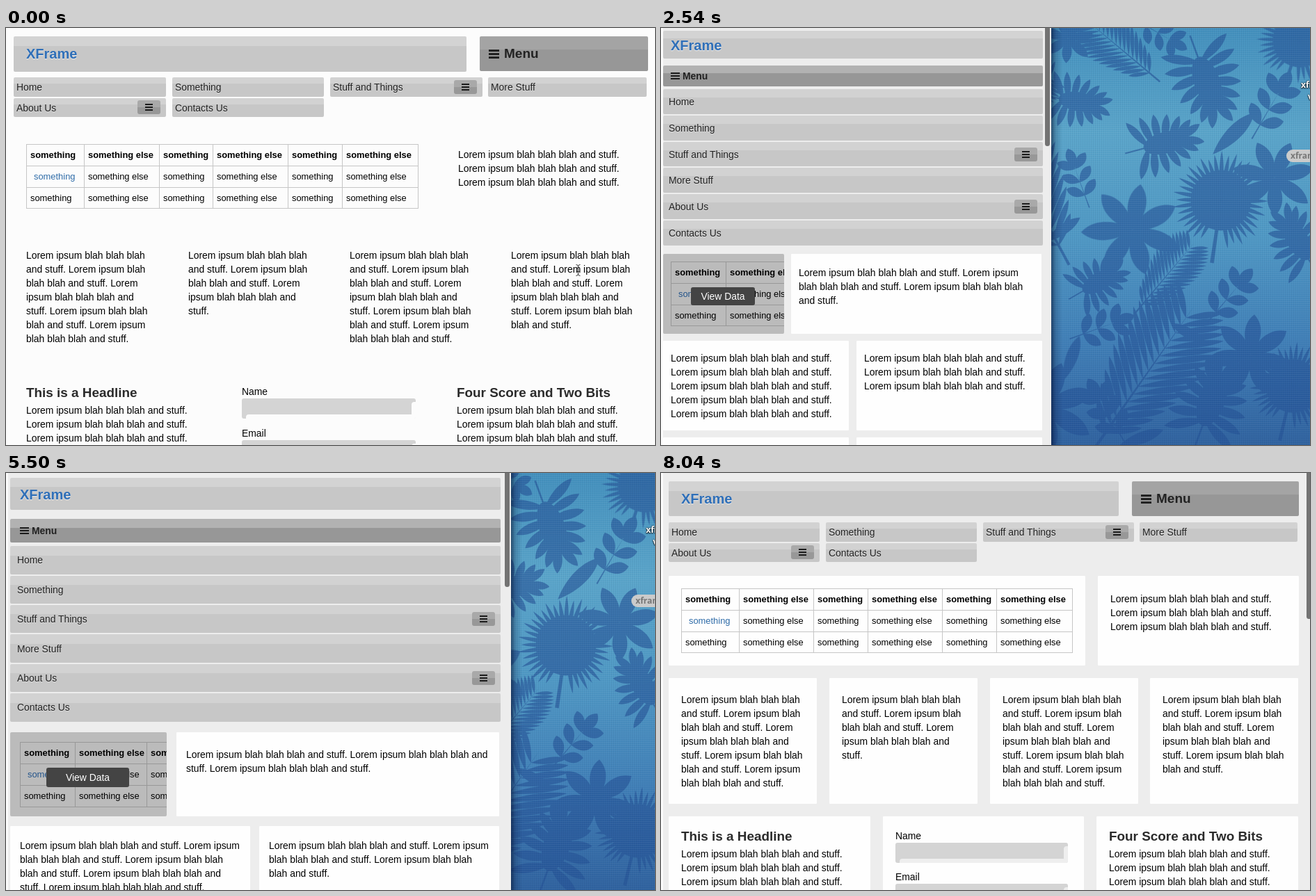
Write an HTML page that moves like this. It is 933 px wide and 600 px high and loops after 8390 ms.

```html
<!DOCTYPE html>
<html lang="en">
<head>
<meta charset="utf-8">
<title>Responsive page demo</title>
<style>
  html, body { margin: 0; width: 100%; height: 100%; overflow: hidden; }
  body { font: 13.92px/20px "Liberation Sans", Arial, sans-serif; color: #000; }
  #stage { position: relative; width: 933px; height: 600px; overflow: hidden; }
  #stage div, #stage p { position: absolute; margin: 0; box-sizing: border-box; }
  p { white-space: nowrap; }
  #desk { position: absolute; inset: 0; }
  #weave {
    inset: 0;
    background:
      repeating-linear-gradient(rgba(255,255,255,.05) 0 1px, transparent 0 3px),
      repeating-linear-gradient(90deg, rgba(0,20,60,.05) 0 1px, transparent 0 3px);
  }
  .file { font: bold 12px/18px "Open Sans", "DejaVu Sans", sans-serif; color: #fff; text-shadow: 0 1px 2px #000, 0 0 2px #000; }
  .pill { left: 899px; top: 175px; width: 70px; height: 18px; border-radius: 9px; padding-left: 6px; background: #cbcbcb; color: #777; text-shadow: none; }
  #shade { top: 0; width: 16px; height: 600px; background: linear-gradient(90deg, rgba(0,10,40,.55), rgba(0,10,40,.18) 40%, transparent); }
  #page { left: 0; top: 0; height: 600px; overflow: hidden; background: #ededed; border-left: 3px solid #fbfbfb; }
  #page > * { margin-left: -3px !important; }
  .card { background: #fefefe; overflow: hidden; border-radius: 1px; }
  .plain, .plain .card { background: #fcfcfc !important; }
  .card.dim { background: #bbb; border-radius: 2px; }
  .bar { border-radius: 2px; background: linear-gradient(#d3d3d3 28%, #c7c7c7 0); }
  .nav { background: linear-gradient(#d2d2d2 33%, #c7c7c7 0); }
  .menu { background: linear-gradient(#b2b2b2 38%, #979797 0); }
  .menu.big { background: linear-gradient(#a4a4a4 38%, #979797 0); }
  .knob { border-radius: 3px; background: linear-gradient(#a9a9a9 48%, #989898 0); }
  .lines { background: repeating-linear-gradient(#1c1c1c 0 2px, transparent 0 4px); }
  .lines.big { background: repeating-linear-gradient(#222 0 2.5px, transparent 0 5px); }
  .logo { font-size: 20px; font-weight: bold; color: #2f6fb8; text-shadow: 0 1px 1px #eee; }
  .item { color: #222; text-shadow: 0 1px 0 rgba(255,255,255,.4); }
  .label { font-weight: bold; color: #222; }
  .label.big { font-size: 19px; }
  .head { font-size: 18.9px; font-weight: bold; color: #2b2b2b; }
  .cell { border: 1px solid #c6c6c6; padding-left: 5px; font-size: 12.9px; line-height: 30px; white-space: nowrap; }
  .dim .cell { border-color: #989898; }
  .th { font-weight: bold; }
  .link { padding-left: 10px; color: #2f6ca8; }
  .dim .link { color: #23548a; }
  .view { display: flex; align-items: center; justify-content: center; background: #444; color: #fff; border-radius: 3px; }
  .field { background: #d4d4d4; border-radius: 3px; overflow: hidden; }
  .edge { background: #eee; border-top-left-radius: 4px; }
  .plain .edge { background: #fcfcfc; }
  .thumb { background: #737373; border-radius: 0 0 4px 4px; }
  #cursor { left: 819px; top: 340px; }
</style>
</head>
<body>
<div id="stage">
  <svg id="desk" width="933" height="600">
    <defs>
      <linearGradient id="sky" x2="0" y2="1">
        <stop offset="0" stop-color="#4390bd"/>
        <stop offset=".25" stop-color="#5aa5ca"/>
        <stop offset=".5" stop-color="#4f98c4"/>
        <stop offset=".75" stop-color="#407fb7"/>
        <stop offset="1" stop-color="#2f629f"/>
      </linearGradient>
    </defs>
    <rect width="933" height="600" fill="url(#sky)"/>
    <g id="leaves" fill="#245094" opacity=".6"/>
  </svg>
  <div id="weave"></div>
  <p class="file" style="left:920px;top:73px">xframe</p>
  <p class="file" style="left:930px;top:90px">v1</p>
  <div class="file pill">xframe</div>
  <div id="shade"></div>
  <div id="page"></div>
  <svg id="cursor" style="position:absolute" width="8" height="17" fill="none" stroke="#333">
    <path d="M.5 .5Q3.5 .5 3.5 3V14Q3.5 16.5 .5 16.5M6.5 .5Q3.5 .5 3.5 3M3.5 14Q3.5 16.5 6.5 16.5M2 10.5H5"/>
  </svg>
</div>
<script>
const LOOP = 8390;
// time, window width
const STEPS = [
  [0, 943], [1490, 915], [1640, 850], [1790, 773], [1940, 735], [2090, 702], [2240, 681],
  [2540, 561], [2690, 505], [2840, 455], [2990, 418], [3130, 396], [3280, 383],
  [4480, 388], [4630, 405], [4770, 438], [4910, 482], [5060, 611],
  [5360, 668], [5500, 726], [5800, 758], [5950, 796], [6100, 836], [6250, 875],
  [6400, 900], [6550, 920], [6700, 933], [6850, 936], [7300, 937]
];
const NAV = ['Home', 'Something', 'Stuff and Things', 'More Stuff', 'About Us', 'Contacts Us'];
const hasKnob = i => i === 2 || i === 4;
const $ = id => document.getElementById(id);
const many = (n, f) => Array.from({ length: n }, (_, i) => f(i)).join('');
const lorem = n => many(n, () => 'Lorem ipsum blah blah blah and stuff. ');

// Desktop leaves, drawn in a box of about 200 units
const petal = (l, w, a, x = 0, y = 0) =>
  `<path transform="translate(${x} ${y}) rotate(${a})" d="M0 0C${w * .7} ${-l * .25} ${w * 1.2} ${-l * .7} 0 ${-l}C${-w * 1.2} ${-l * .7} ${-w * .7} ${-l * .25} 0 0"/>`;
const pair = (l, w, a, y) => petal(l, w, a, 0, y) + petal(l, w, -a, 0, y);
const SHAPES = {
  star: () => many(7, i => petal(88 + i * 5 % 14, 24, i * 51.4)),
  fan: () => '<circle r="62"/><path d="M-3 0h6l5 130h-8z"/>' +
    many(37, i => petal(88 + i * 37 % 15, 6, i * 9 - 162)),
  frond: () => '<path d="M-2 125L0-105 2 125z"/>' +
    many(16, i => pair(28 + 58 * Math.sin(Math.PI * (i + 2) / 19), 6, 48, 95 - 12 * i)),
  monstera: () => '<ellipse rx="30" ry="62"/><path d="M-2 50h4v65h-4z"/>' +
    many(7, i => pair(92 - i * 4, 15, 118 - 16 * i, 48 - 15 * i)),
  sprig: () => '<path d="M-2 110L0-40 2 110z"/>' + petal(70, 24, 0, 0, -35) +
    many(3, i => pair(66, 22, 52, 65 - 48 * i)),
  oval: () => petal(200, 34, 0, 0, 100)
};
// x, y, size in percent, turn
const LEAVES = {
  star: [[678, 290, 75, 10], [882, 215, 62, 25], [848, 470, 66, 5], [553, 545, 76, 20], [440, 38, 66, 0], [585, 15, 40, 30]],
  fan: [[805, 248, 70, 10], [425, 500, 66, -15], [918, 18, 62, 20], [908, 515, 62, 15]],
  frond: [[525, 225, 105, -28], [700, 495, 112, 35], [728, 355, 58, 40], [510, 90, 58, 70], [655, 25, 65, -50], [400, 200, 55, 20]],
  monstera: [[785, 78, 62, 160], [600, 106, 46, 100], [725, 165, 52, 75], [630, 365, 44, 60], [492, 440, 58, 35], [792, 535, 64, 20], [915, 305, 52, -30], [420, 310, 55, 40]],
  sprig: [[635, 430, 46, 70], [818, 385, 48, 40], [878, 110, 52, 30], [600, 215, 42, -20], [450, 170, 48, -35], [640, 550, 50, -30], [720, 10, 40, 120]],
  oval: [[823, 152, 42, 45], [395, 130, 34, -40], [578, 290, 30, 55], [760, 440, 30, -60], [590, 475, 34, 20], [690, 590, 34, 70]]
};
$('leaves').innerHTML = Object.entries(LEAVES).map(([kind, spots]) => spots.map(([x, y, s, a]) =>
  `<g transform="translate(${x} ${y}) rotate(${a}) scale(${s / 100})">${SHAPES[kind]()}</g>`).join('')).join('');

// Page parts
const rect = (l, t, r, b, cls, body = '') => {
  [l, t, r, b] = [l, t, r, b].map(Math.round);
  return `<div class="${cls}" style="left:${l}px;top:${t}px;width:${r - l}px;height:${b - t}px">${body}</div>`;
};
const text = (x, mid, s, cls = '', w = 0) =>
  `<p class="${cls}" style="left:${Math.round(x)}px;top:${Math.round(mid) - 10}px;${w ? `width:${w}px;white-space:normal` : ''}">${s}</p>`;
const card = (l, t, r, b, pad, mid, n) =>
  rect(l, t, r, b, 'card') + text(l + pad, t + mid, lorem(n), '', r - l - 2 * pad + 2);
const knob = (r, mid) =>
  rect(r - 33, mid - 10, r, mid + 10, 'knob', rect(11, 5, 22, 15, 'lines'));

function table(x, y, first, wide, slim) {
  const widths = [first, wide, slim, wide, slim, wide + 1.5];
  return many(3, row => {
    let l = x;
    return widths.map((w, i) => {
      const cls = row === 0 ? ' th' : row === 1 && i === 0 ? ' link' : '';
      const top = y + row * 30.8;
      const cell = rect(l, top, Math.round(l + w) + 1, Math.round(top + 30.8) + 1, 'cell' + cls,
        i % 2 ? 'something else' : 'something');
      l += w;
      return cell;
    }).join('');
  });
}

// Header, menu bar and navigation of the stacked layouts
function stack(o) {
  const mid = o.menu + o.menuH / 2;
  return rect(o.l, o.top, o.r, o.top + o.topH, 'bar') + text(o.logoX, o.top + o.topH / 2 + 1, 'XFrame', 'logo') +
    rect(o.l, o.menu, o.r, o.menu + o.menuH, 'bar menu') +
    rect(o.iconX, mid - 5, o.iconX + 13, mid + 5, 'lines') + text(o.iconX + 17, mid, 'Menu', 'label') +
    NAV.map((name, i) => {
      const y = o.nav + i * o.pitch, c = y + o.pitch / 2 - 1;
      return rect(o.l, y, o.r, y + o.pitch - 2, 'bar nav') + text(o.navX, c, name, 'item') +
        (hasKnob(i) ? knob(o.r - 8, c) : '');
    }).join('');
}

function narrow(at) {
  const l = at(3, 6), r = at(371, 467), t = at(316, 359), c1 = at(428, 478), c2 = at(502, 560);
  const pad = at(7, 9), mid = at(24, 27);
  return stack({
    l, r, top: at(8, 12), topH: at(44, 51), logoX: at(14, 20), menu: at(58, 70), menuH: at(33, 38),
    iconX: at(10, 15), nav: at(94, 112), pitch: at(35.8, 39.8), navX: at(10, 15)
  }) +
    rect(l, t, r, at(422, 470), 'card dim', table(at(7.5, 9.5), at(6.5, 8.5), 72.5, 97.5, 69)) +
    rect(at(88, 111), at(361, 406), at(285, 360), at(394, 444), 'view', 'View Data') +
    card(l, c1, r, at(496, 552), pad, mid, 3) +
    card(l, c2, r, c2 + 150, pad, mid, 5);
}

function middle(at) {
  const l = at(3, 7), r = at(549, 757), t = at(325, 387), b = at(440, 510);
  const pad = at(11, 15), row = at(450, 524), low = at(579, 663), gap = at(10, 14);
  return stack({
    l, r, top: at(4, 8), topH: at(40, 48), logoX: at(14, 22), menu: at(54, 70), menuH: at(30, 34),
    iconX: at(14, 22), nav: at(88, 110), pitch: at(37.8, 43.75), navX: at(11, 18)
  }) +
    rect(l, t, at(177, 247), b, 'card dim', table(pad, pad, 79, 103, 76)) +
    rect(at(43, 62), at(373, 439), at(135, 189), at(399, 467), 'view', 'View Data') +
    card(at(187, 261), t, at(547, 755), b, pad, at(27, 33), 3) +
    [[l, at(270, 374), 5], [at(281, 388), at(548, 755), 3]].map(([x, e, n]) =>
      card(x, row, e, low, pad, at(25, 30), n) + rect(x, low + gap, e, low + 150, 'card')).join('');
}

function field(l, t, w) {
  return rect(l, t, l + w, t + 29, 'field',
    rect(w - 6, 5, w, 29, 'edge') + rect(6, 23, w, 29, 'edge'));
}

function wide(at, w) {
  const l = at(9, 11), pad = at(17, 18), top = at(10, 12), menu = at(631, 677), end = at(855, 917);
  const mid = at(33.5, 37), t = at(141, 148), b = at(268, 277), dim = w < 925;
  const row = at(284, 295), colW = at(199, 213), rows = colW - 2 * pad >= 173 ? 7 : 8;
  const low = row + rows * 20 + at(39, 41), row3 = low + at(16, 18), cardW = at(271, 289.5);
  const navX = [l, at(220, 237), at(430.5, 463), at(641, 688)];
  const cols = [l, at(224, 242), at(438.5, 472.5), at(653, 703)];
  const [a, f, c] = [l, at(295.5, 318.5), at(582, 626)];
  const story = (x, title) => rect(x, row3, x + cardW, 640, 'card') +
    text(x + pad, row3 + at(28, 29), title, 'head') +
    text(x + pad, row3 + at(52, 54), lorem(5), '', cardW - 2 * pad + 2);
  const input = (name, y) => text(f + pad, row3 + y, name) +
    field(f + pad, row3 + y + 10, Math.round(at(230, 248)));

  return rect(l, top, at(615, 658), at(56, 62), 'bar') + text(at(26, 29), mid, 'XFrame', 'logo') +
    rect(menu, top, end, at(57, 62), 'bar menu big') +
    rect(menu + 12.5, mid - 6, menu + 28, mid + 7, 'lines big') + text(menu + 34.5, mid, 'Menu', 'label big') +
    NAV.map((name, i) => {
      const x = navX[i % 4], y = i < 4 ? at(66, 71) : at(95.5, 100.5);
      const r = x + (i === 3 ? at(212, 227) : at(203, 217));
      return rect(x, y, r, y + 27.5, 'bar nav') + text(x + 4, y + 14, name, 'item') +
        (hasKnob(i) ? knob(r - 8, y + 13.5) : '');
    }).join('') +
    rect(l, t, at(569, 610), b, dim ? 'card dim' : 'card',
      table(pad, pad, at(81, 82.5), at(105.5, 107.7), at(76.5, 77.6))) +
    (dim ? rect(at(137, 150), at(196, 205), at(438, 470), at(238, 247), 'view', 'View Data') : '') +
    card(at(585, 628), t, end, b, pad, at(31, 33), 3) +
    cols.map((x, i) => card(x, row, x + colW, low, pad, at(30, 31), [5, 3, 5, 4][i])).join('') +
    story(a, 'This is a Headline') +
    rect(f, row3, f + cardW, 640, 'card') + input('Name', at(26, 27.5)) + input('Email', at(84, 87)) +
    story(c, 'Four Score and Two Bits');
}

// Each layout with the widths its measures belong to, and the thumb length
const LAYOUTS = [
  { upTo: 520, from: 383, to: 482, draw: narrow, thumb: [123, 118] },
  { upTo: 800, from: 561, to: 773, draw: middle, thumb: [170, 162] },
  { upTo: Infinity, from: 875, to: 937, draw: wide, thumb: [212, 210] }
];

function render(step) {
  const w = STEPS[step][1];
  const { from, to, draw, thumb } = LAYOUTS.find(s => w < s.upTo);
  const at = (a, b) => a + (b - a) * (w - from) / (to - from);
  const page = $('page');
  page.className = step ? '' : 'plain';
  page.style.width = w + 'px';
  page.innerHTML = draw(at, w) + rect(w - 9, -4, w - 2, at(...thumb), 'thumb');
  $('shade').style.left = w + 'px';
}

const start = performance.now();
let shown = -1;
function tick() {
  const t = Math.max(0, performance.now() - start) % LOOP;
  const step = STEPS.findLastIndex(s => s[0] <= t);
  if (step !== shown) render(shown = step);
  $('cursor').style.visibility = t < 150 ? 'visible' : 'hidden';
  requestAnimationFrame(tick);
}
tick();
</script>
</body>
</html>
```
